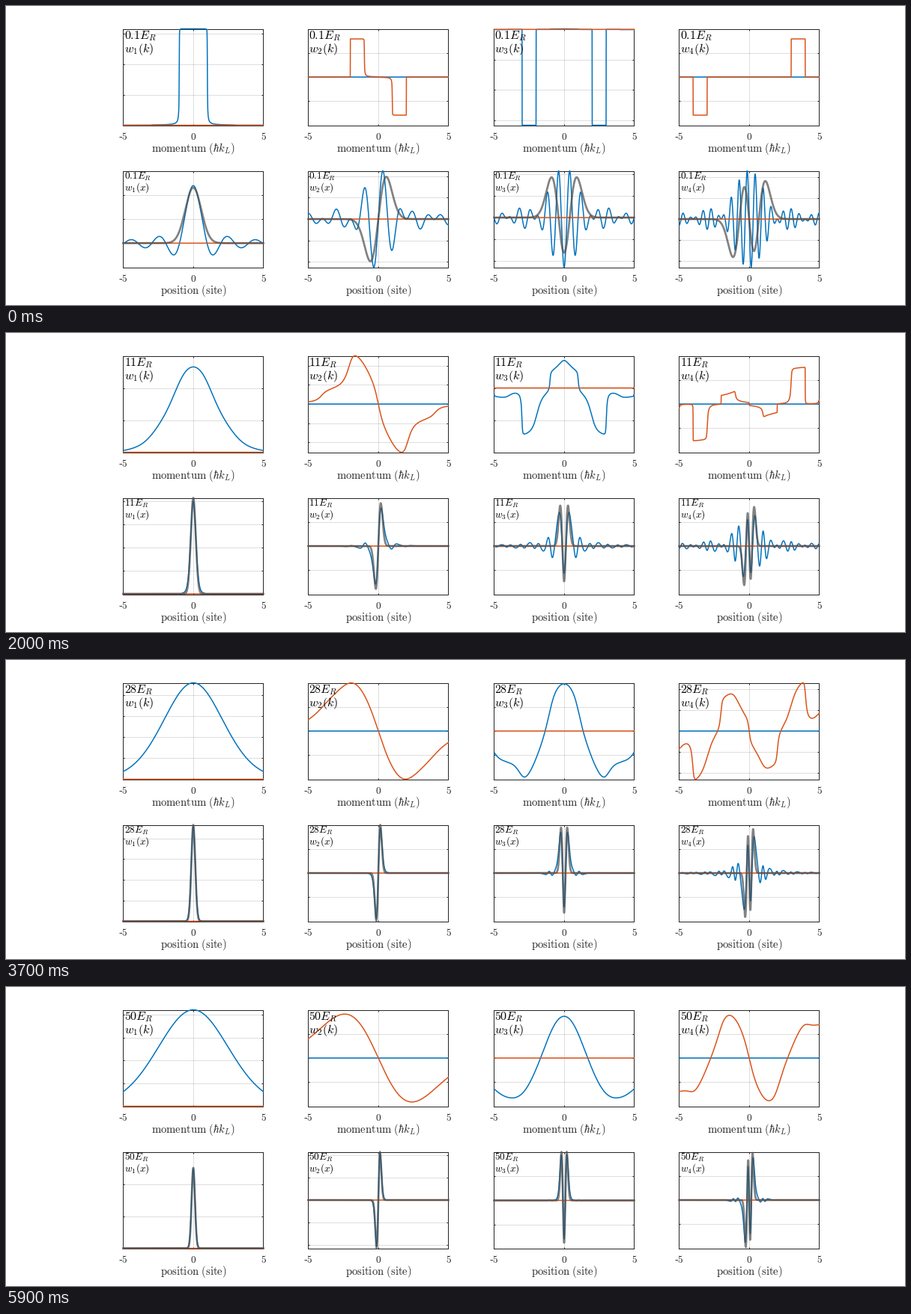
A matplotlib script for the animation above (6.9 s loop, 1200 by 400 pixels).

```python
import numpy as np
import matplotlib.pyplot as plt
from matplotlib.animation import FuncAnimation

plt.rcParams.update({"mathtext.fontset": "cm", "font.family": "Liberation Serif"})

W, H = 1200, 400
PX = 0.72                        # points per pixel at 100 dpi
BLUE, ORANGE, INK = "#0072BD", "#D95319", "#262626"
HOLD, STEPS = 10, 69             # frames at 0.1, frames in a loop
K_SCALE, X_SCALE = np.sqrt(0.1), 0.1154
MAX_TICKS, MAX_WASTE = 5, 0.255
NICE = [m * 10.0 ** e for e in (-3, -2, -1, 0) for m in (1, 2, 5)]

# Plane-wave basis: one row per quasimomentum, one column per reciprocal vector
NQ, NG = 200, 6
q = -1 + (np.arange(NQ) + 0.5) * 2 / NQ
orders = np.arange(-NG, NG + 1)
k_grid = q[:, None] + 2 * orders
k = k_grid.T.ravel()
visible = np.abs(k) <= 5
x = np.linspace(-5, 5, 1001)
COS = np.cos(np.pi * np.outer(x, k)) / NQ
SIN = np.sin(np.pi * np.outer(x, k)) / NQ


def wannier(depth):
    """Momentum and position amplitudes of the four lowest bands."""
    size = len(orders)
    ham = np.zeros((NQ, size, size))
    ham[:, range(size), range(size)] = k_grid ** 2 + depth / 2
    ham -= depth / 4 * (np.eye(size, k=1) + np.eye(size, k=-1))
    vectors = np.linalg.eigh(ham)[1]
    bands = []
    for band in range(4):
        c = vectors[:, :, band]
        odd = band % 2
        phase = np.sign((c * k_grid if odd else c).sum(axis=1))
        phase *= 1 if band in (0, 3) else -1
        c = (c * phase[:, None]).T.ravel()
        bands.append((c[visible] * K_SCALE, (-SIN if odd else COS) @ c * X_SCALE))
    return bands


def oscillator(depth):
    """Harmonic approximation of the four lowest states."""
    xi = depth ** 0.25 * np.pi * x
    base = depth ** 0.125 * np.pi ** 0.25 * np.exp(-xi ** 2 / 2) * X_SCALE
    hermite = [1, np.sqrt(2) * xi, (2 * xi ** 2 - 1) / np.sqrt(2),
               (2 * xi ** 3 - 3 * xi) / np.sqrt(3)]
    return [base * h for h in hermite]


def tick_range(lo, hi, step, outward):
    a, b = lo / step, hi / step
    if outward:
        return np.floor(a + 1e-6), np.ceil(b - 1e-6)
    return np.ceil(a - 1e-6), np.floor(b + 1e-6)


def finest_step(lo, hi, outward):
    for step in NICE:
        first, last = tick_range(lo, hi, step, outward)
        if last - first + 1 <= MAX_TICKS:
            return step, first, last


def auto_scale(ax, *curves):
    """Round each limit to a tick unless that leaves too much empty space."""
    lo = min(0, *(c.min() for c in curves))
    hi = max(0, *(c.max() for c in curves))
    slack = MAX_WASTE * (hi - lo)
    step, first, last = finest_step(lo, hi, True)
    if lo - first * step <= slack:
        lo = first * step
    if last * step - hi <= slack:
        hi = last * step
    step, first, last = finest_step(lo, hi, False)
    ax.set_ylim(lo, hi)
    ax.set_yticks(np.arange(first, last + 1) * step)


fig = plt.figure(figsize=(W / 100, H / 100), dpi=100, facecolor="white")


def label(px, py, text, size, color=INK, ha="center"):
    return fig.text(px / W, 1 - py / H, text, fontsize=size * PX, color=color,
                    ha=ha, va="baseline")


def make_axes(left, top):
    # Just short of the pixel centre, so the frame always snaps to that pixel
    left, top = left + 0.49, top + 0.51
    width, height = 187, 129
    ax = fig.add_axes([left / W, 1 - (top + height) / H, width / W, height / H])
    ax.set_xlim(-5, 5)
    ax.set_xticks([-5, 0, 5])
    ax.set_axisbelow(True)
    ax.grid(color=INK, alpha=0.15, linewidth=PX)
    ax.tick_params(direction="in", length=1.9 * PX, width=PX, color=INK,
                   top=True, right=True, labelbottom=False, labelleft=False)
    for spine in ax.spines.values():
        spine.set(linewidth=PX, color=INK)
    for i, text in enumerate(("-$5$", "$0$", "$5$")):
        label(left + width * i / 2, top + 148, text, 13.33)
    return ax


def add_line(ax, xs, color, width=1.5, **style):
    return ax.plot(xs, 0 * xs, color=color, linewidth=width * PX, zorder=3,
                   clip_on=False, snap=False, **style)[0]


panels, depth_labels = [], []
for i in range(4):
    left = round(156 + 247.3 * i)
    ax_k, ax_x = make_axes(left, 30), make_axes(left, 220)
    k_lines = [add_line(ax_k, k[visible], c) for c in (BLUE, ORANGE)]
    x_lines = [add_line(ax_x, x, c) for c in (BLUE, ORANGE)]
    x_lines.append(add_line(ax_x, x, "0.3", 2.7, alpha=0.7))
    panels.append((ax_k, k_lines, ax_x, x_lines))

    center = left + 94
    label(center, 195, r"$\mathrm{momentum}\ (\hbar k_L)$", 14.67)
    label(center, 385, r"$\mathrm{position\ (site)}$", 14.67)
    for var, size, y1, y2 in (("k", 16, 44.5, 62.5), ("x", 13.33, 232, 247)):
        depth_labels.append(label(left + 1.5, y1, "", size, "black", "left"))
        label(left + 1.5, y2, f"$w_{i + 1}({var})$", size, "black", "left")


def update(frame):
    depth = 0.1 if frame < HOLD else min(frame - HOLD + 1, 50)
    for text in depth_labels:
        text.set_text(f"${depth}E_R$")
    states = zip(panels, wannier(depth), oscillator(depth))
    for band, (panel, (wk, wx), ho) in enumerate(states):
        ax_k, k_lines, ax_x, x_lines = panel
        k_lines[band % 2].set_ydata(wk)
        x_lines[0].set_ydata(wx)
        x_lines[2].set_ydata(ho)
        auto_scale(ax_k, wk)
        auto_scale(ax_x, wx, ho)
    return []


anim = FuncAnimation(fig, update, frames=STEPS, interval=100, repeat=True,
                     repeat_delay=0, init_func=lambda: update(0))
plt.show()
```
